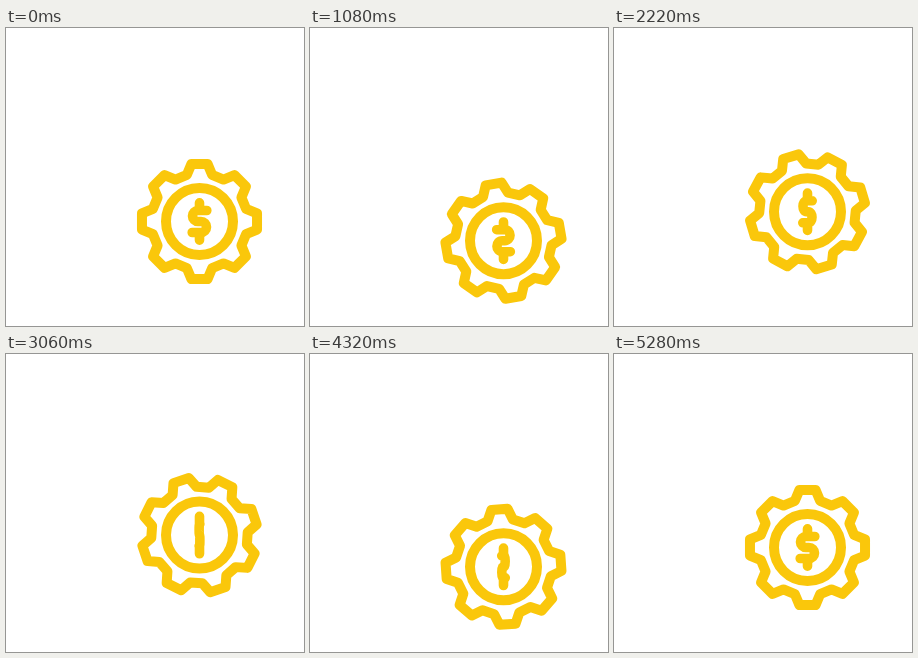
These frames come from a looping animation (298x298 px, 5.4 s). An HTML page:

```html
<!DOCTYPE html>
<html lang="en">
<head>
<meta charset="utf-8">
<title>Bouncing coin gear</title>
<style>
  html, body { margin: 0; width: 100%; height: 100%; overflow: hidden; background: #fff; }
  svg { display: block; width: 298px; height: 298px; }
  path, circle { fill: none; stroke: #fac70b; stroke-width: 10; stroke-linecap: round; stroke-linejoin: round; }
  #dollar { stroke-width: 9.6; vector-effect: non-scaling-stroke; }
</style>
</head>
<body>
<svg viewBox="0 0 298 298">
  <g id="icon">
    <path id="gear"/>
    <circle r="33.5"/>
    <path id="dollar" d="M7.3-11H-1.5A5.5 5.5 0 0 0-1.5 0H1.5A5.5 5.5 0 0 1 1.5 11H-7.3M0-18.7V-11M0 11V18.7"/>
  </g>
</svg>
<script>
const LOOP = 5400, STEP = 30, LAST = 5280, CENTER = 193.5, TEETH = 8;
const icon = document.getElementById('icon');
const gear = document.getElementById('gear');
const dollar = document.getElementById('dollar');

// Each key is [time, value]; the curve passes through all of them.
const height = [[0, 193.5], [1230, 213.5], [2670, 174.8], [4200, 213.5], [5280, 193.5]];
const spin = [[0, 0], [600, 69.3], [1530, 177], [2220, 253.3], [3060, 341.4], [4320, 491], [5280, 540]];
const flip = [[0, 0], [600, 89], [1530, 223], [2220, 310], [3060, 447], [4320, 616], [5280, 720]];

function slope(keys, i) {
  if (i === keys.length - 1) return 0;
  const a = keys[Math.max(i - 1, 0)], b = keys[i + 1];
  return (b[1] - a[1]) / (b[0] - a[0]);
}

function sample(keys, time, resting) {
  let i = 0;
  while (i < keys.length - 2 && time >= keys[i + 1][0]) i++;
  const [t0, v0] = keys[i], [t1, v1] = keys[i + 1];
  const span = t1 - t0, u = (time - t0) / span;
  const m0 = resting ? 0 : slope(keys, i) * span;
  const m1 = resting ? 0 : slope(keys, i + 1) * span;
  const ease = u * u * (3 - 2 * u);
  return v0 + (v1 - v0) * ease + m0 * u * (1 - u) ** 2 - m1 * u * u * (1 - u);
}

function gearPath() {
  const points = [];
  const add = (radius, degrees) => {
    const a = degrees * Math.PI / 180;
    points.push((radius * Math.sin(a)).toFixed(2) + ' ' + (-radius * Math.cos(a)).toFixed(2));
  };
  for (let tooth = 0; tooth < TEETH; tooth++) {
    const axis = tooth * 360 / TEETH;
    add(48.3, axis - 15.2);
    add(58.1, axis - 8);
    add(58.1, axis + 8);
    add(48.3, axis + 15.2);
  }
  return 'M' + points.join('L') + 'Z';
}

function draw(now) {
  const time = Math.min(LAST, Math.floor(now % LOOP / STEP) * STEP);
  const facing = Math.cos(sample(flip, time) * Math.PI / 180);
  // A zero scale would hide the edge-on sign.
  const width = Math.abs(facing) < 0.02 ? 0.02 : facing;
  icon.setAttribute('transform', `translate(${CENTER} ${sample(height, time, true)})`);
  gear.setAttribute('transform', `rotate(${sample(spin, time)})`);
  dollar.setAttribute('transform', `scale(${width} 1)`);
}

gear.setAttribute('d', gearPath());
const start = performance.now();
function tick() {
  draw(performance.now() - start);
  requestAnimationFrame(tick);
}
tick();
</script>
</body>
</html>
```
